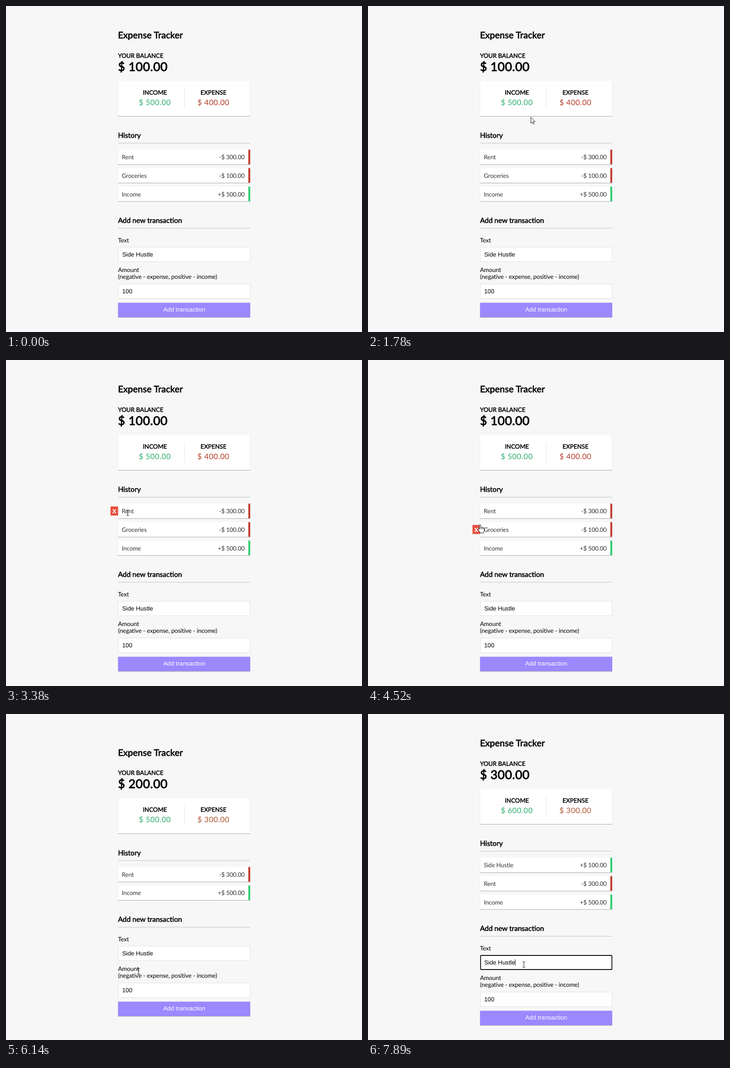
These frames come from a looping animation (781 px wide and 717 px high, 7990 ms). An HTML page:

```html
<!DOCTYPE html>
<html lang="en">
<head>
<meta charset="utf-8">
<title>Expense Tracker</title>
<style>
html, body { margin: 0; width: 100%; height: 100%; overflow: hidden; background: #f7f7f7; }
svg { display: block; width: 781px; height: 717px; }
text { font: 13.26px Lato, sans-serif; text-rendering: geometricPrecision; white-space: pre; letter-spacing: -.008em; }
.bold { stroke: currentColor; stroke-width: .038em; letter-spacing: 0; }
.ui { font-family: "Liberation Sans", Arial, sans-serif; letter-spacing: 0; }
.heading { letter-spacing: .1px; }
.money { letter-spacing: .55px; }
.balance { letter-spacing: .45px; }
.mid { text-anchor: middle; }
.end { text-anchor: end; letter-spacing: -.015em; }
.box { fill: #fff; filter: drop-shadow(0 1px .7px #0005); }
.field { fill: #fff; stroke: #dedede; stroke-width: .9; }
.rule { fill: #bbb; }
</style>
</head>
<body>
<svg viewBox="0 0 781 717">
  <g id="page"></g>
  <g id="buttons"></g>
  <g id="spinner">
    <rect x="513" width="11.5" height="17" fill="#efefef"/>
    <path d="M516 6.5l2.8-3.3 2.8 3.3zM516 10.5l2.8 3.3 2.8-3.3z" fill="#505050"/>
  </g>
  <g id="focus">
    <rect x="246.9" y="531" width="288.2" height="31" rx="1.8" fill="none" stroke="#101010" stroke-width="1.8"/>
    <path d="M323 539.5V553" stroke="#000"/>
  </g>
  <circle id="ripple" r="10.3" fill="#dece3c" fill-opacity=".65"/>
  <g id="cursor" fill="#fff" stroke="#000" stroke-width=".9" stroke-linejoin="round">
    <path id="arrow" d="M.4 .5V13.8L3.4 11L5.6 15.7L7.6 14.8L5.5 10.2H9.5Z"/>
    <path id="beam" fill="none" d="M-3-6H-1Q0-6 0-5Q0-6 1-6H3M0-5V5M-3 6H-1Q0 6 0 5Q0 6 1 6H3"/>
    <path id="hand" d="M-1.4 10.5V1.6a1.4 1.4 0 0 1 2.8 0V6.6a1.4 1.3 0 0 1 2.7.3a1.4 1.3 0 0 1 2.6.5a1.3 1.2 0 0 1 2.4.8V12.5q0 2-1.6 4V18.7H-.2V17Q-3 14-4.7 10.8Q-5 8.6-3.2 9ZM1.4 6.6V10M4.1 7V10.2M6.7 7.5V10.4"/>
  </g>
</svg>
<script>
const LOOP = 7990, DELETED = 5240, ADDED = 7040, FOCUSED = 7800;
const LEFT = 245.7, PITCH = 40.6;
const $ = id => document.getElementById(id);

const text = (x, y, str, cls = '', size = 13.26, color = '#000') =>
  `<text x="${x}" y="${y}" class="${cls}" style="font-size:${size}px;color:${color}" fill="${color}">${str}</text>`;
const rect = (x, y, w, h, attrs) => `<rect x="${x}" y="${y}" width="${w}" height="${h}" ${attrs}/>`;
const wide = (y, h, attrs) => rect(245.8, y, 289.9, h, attrs);
const field = (y, value) => rect(246.5, y + .5, 289, 32, 'class="field"') + text(254.9, y + 21, value, 'ui');
const title = (y, str) => text(LEFT, y, str, 'bold', 15.51) + wide(y + 11.1, .9, 'class="rule"');
const total = (x, name, value, color) =>
  text(x, 194.6, name, 'bold mid') + text(x, 217.9, value, 'money mid', 16.57, color);

const row = ([name, amount], i) => {
  const y = 315.9 + i * PITCH;
  return wide(y, 32.3, 'class="box"') +
    rect(531.6, y, 4.1, 32.3, `fill="${amount[0] == '+' ? '#2ecc71' : '#c0392b'}"`) +
    text(254, y + 21.4, name, '', 13.26, '#333') +
    text(523.4, y + 21.4, amount, 'end', 13.26, '#333');
};

const rent = ['Rent', '-$ 300.00'], food = ['Groceries', '-$ 100.00'],
      income = ['Income', '+$ 500.00'], hustle = ['Side Hustle', '+$ 100.00'];
const phases = [
  { balance: 100, earned: 500, spent: 400, red: '#b53a28', rows: [rent, food, income] },
  { balance: 200, earned: 500, spent: 300, red: '#b0552f', rows: [rent, income] },
  { balance: 300, earned: 600, spent: 300, red: '#b0552f', rows: [hustle, rent, income] },
];

function page({ balance, earned, spent, red, rows }) {
  const short = rows.length < 3;
  return `<g transform="translate(0 ${short ? 20.6 : 0})">` +
    text(LEFT, 71.3, 'Expense Tracker', 'bold heading', 19.89) +
    text(LEFT, 113.5, 'YOUR BALANCE', 'bold') +
    text(LEFT, 142.6, `$ ${balance}.00`, 'bold balance', 26.51) +
    wide(165, 77, 'class="box"') + rect(390.8, 181.5, .9, 43.5, 'fill="#dedede"') +
    total(326.6, 'INCOME', `$ ${earned}.00`, '#2eae6e') +
    total(455.2, 'EXPENSE', `$ ${spent}.00`, red) +
    title(290.1, 'History') + rows.map(row).join('') +
    `</g><g transform="translate(0 ${short ? -20 : 0})">` +
    title(477.3, 'Add new transaction') +
    text(LEFT, 519.5, 'Text') + field(530, 'Side Hustle') +
    text(LEFT, 584.6, 'Amount') +
    text(LEFT, 600.2, '(negative - expense, positive - income)') + field(611, '100') +
    wide(652.6, 31.8, 'class="box" style="fill:#9c88ff"') +
    text(391, 672.2, 'Add transaction', 'ui mid', 13.26, '#fff') + '</g>';
}

// Delete buttons: row index, hover start, hover end
const hovers = [[0, 2900, 3880], [1, 4150, Infinity]];
$('buttons').innerHTML = hovers.map(([i]) => '<g>' +
  rect(229.3, 322.2 + i * PITCH, 16.5, 19.9, 'fill="#e74c3c"') +
  text(237.6, 337.4 + i * PITCH, 'x', 'ui mid bold', 16.57, '#fff') + '</g>').join('');

// Pointer path: time, x, y, shape from then on
const path = [
  [440, 497, -14, 'arrow'], [900, 430, 110], [1230, 386, 178], [1360, 366, 229],
  [1700, 366, 229], [1780, 357, 244], [2480, 306, 294], [2900, 283, 316],
  [3060, 275, 326, 'beam'], [3280, 267, 336], [3400, 267, 336],
  [3700, 263, 342, 'arrow'], [4040, 253, 355], [4100, 253, 355],
  [4480, 247, 361, 'hand'], [4520, 246, 361.8], [4940, 240, 371],
  [5280, 240.5, 371, 'arrow'], [5570, 240.5, 371],
  [5640, 243, 385, 'hand'], [5690, 250, 400, 'arrow'],
  [5940, 272, 511, 'beam'], [6040, 282, 543, 'arrow'], [6100, 288, 556, 'beam'],
  [6360, 306, 619], [6480, 307, 624, 'arrow'], [6560, 309, 633, 'hand'],
  [6800, 312.5, 643.5], [7040, 312.5, 643.5, 'arrow'], [7300, 312.5, 643.5],
  [7350, 314, 652, 'hand'], [7400, 319, 643, 'beam'], [7510, 327, 611],
  [7660, 338, 563], [7760, 342, 551], [LOOP, 342, 551],
];

function pointer(t) {
  const next = Math.max(1, path.findIndex(key => key[0] > t));
  const [t0, x0, y0] = path[next - 1], [t1, x1, y1] = path[next];
  const k = Math.max(0, (t - t0) / (t1 - t0));
  const shape = path.slice(0, next).reverse().find(key => key[3])[3];
  return { x: x0 + (x1 - x0) * k, y: y0 + (y1 - y0) * k, shape };
}

const show = (el, on) => el.style.display = on ? '' : 'none';
const within = (t, ...spans) => spans.some(([a, b]) => t >= a && t < b);
const clamp = v => Math.min(1, Math.max(0, v));
let current = -1;

function draw(t) {
  const phase = (t >= DELETED) + (t >= ADDED);
  if (phase != current) $('page').innerHTML = page(phases[current = phase]);

  hovers.forEach(([, from, to], i) => {
    const opacity = t < DELETED ? clamp((t - from) / 300) - clamp((t - to) / 300) : 0;
    $('buttons').children[i].setAttribute('opacity', opacity);
  });

  const { x, y, shape } = pointer(t);
  const at = `translate(${x} ${y})`;
  show($('cursor'), t >= 440);
  $('cursor').setAttribute('transform', at);
  for (const id of ['arrow', 'beam', 'hand']) show($(id), id == shape);

  show($('ripple'), within(t, [5190, 5280], [6900, ADDED], [7780, 7880]));
  $('ripple').setAttribute('transform', at);

  show($('spinner'), within(t, [6240, 6480], [7400, 7510]));
  $('spinner').setAttribute('transform', `translate(0 ${phase == 1 ? 599 : 619})`);
  show($('focus'), t >= FOCUSED);
}

const start = performance.now();
(function tick() {
  draw((performance.now() - start) % LOOP);
  requestAnimationFrame(tick);
})();
</script>
</body>
</html>
```
